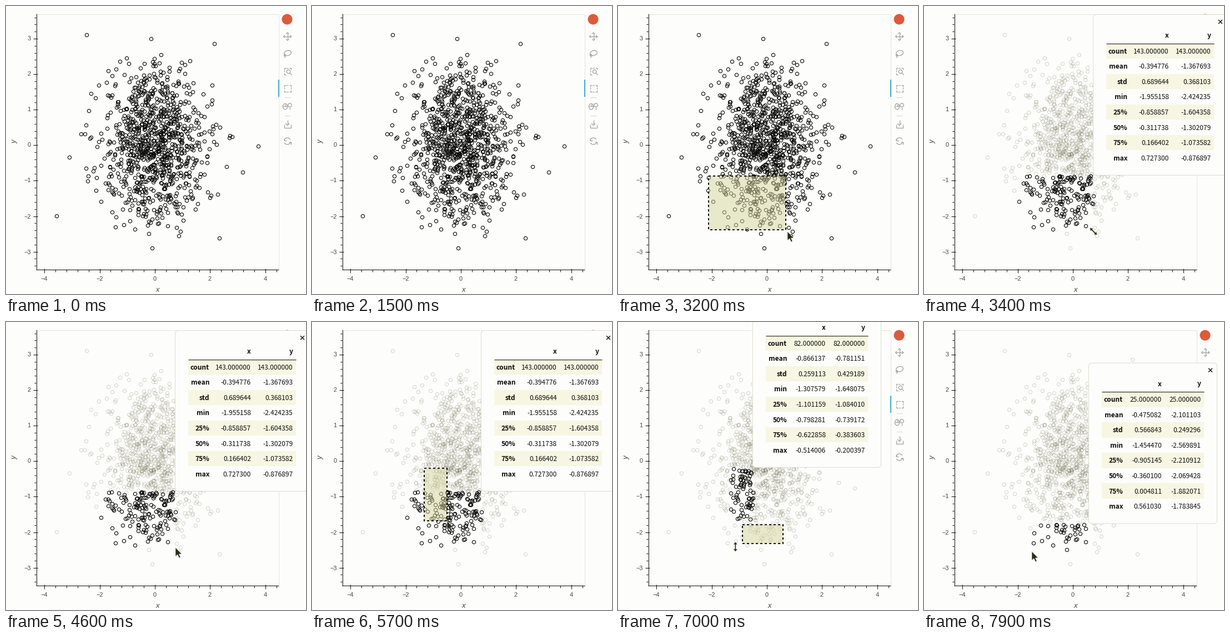
These frames come from a looping animation (540 px wide and 520 px high, 8000 ms). A matplotlib script:

```python
import numpy as np
import matplotlib.pyplot as plt
from matplotlib.animation import FuncAnimation
from matplotlib.patches import Arc, Circle, Ellipse, FancyBboxPatch, Polygon, Rectangle

W, H, PX = 540, 520, 0.72  # PX: points per pixel at 100 dpi
FRAMES, STEP = 80, 100
BG, INK, GREY, ICON = "#fdfdfb", "#0c0c0a", "#444442", "#a3a39e"
TABLE_FONT = "Noto Sans CJK JP"

fig = plt.figure(figsize=(W / 100, H / 100), dpi=100, facecolor=BG)
ax = fig.add_axes([0, 0, 1, 1])
ax.set_xlim(0, W)
ax.set_ylim(H, 0)
ax.axis("off")


def sx(x):
    return 267.5 + 49.7 * np.asarray(x)


def sy(y):
    return 250.8 - 64.1 * np.asarray(y)


def line(xs, ys, color=INK, lw=1.0, z=2, **kw):
    return ax.plot(xs, ys, color=color, lw=lw * PX, zorder=z,
                   solid_capstyle="butt", **kw)[0]


def text(x, y, s, size, z=2, **kw):
    kw.setdefault("va", "baseline")
    return ax.text(x, y, s, fontsize=size * PX, zorder=z, **kw)


def shape(patch, z=2):
    patch.set_zorder(z)
    return ax.add_patch(patch)


# --- axes -------------------------------------------------------------
def draw_axes():
    line([54, 490.5, 490.5], [14.5, 14.5, 475], "#e6e6dc")
    line([54.5, 54.5], [14, 476])
    line([54, 491], [475.5, 475.5])
    font = dict(color=GREY, family="Liberation Sans")
    for k in range(-10, 12):
        x = np.floor(sx(0.4 * k)) + 0.5
        major = k % 5 == 0
        line([x, x], [473.5 if major else 476, 481.5 if major else 479.5])
        if major:
            text(x, 495.5, f"{2 * k // 5}".replace("-", "\u2212"), 11, ha="center", **font)
    for k in range(-17, 19):
        y = np.floor(sy(0.2 * k)) + 0.5
        major = k % 5 == 0
        line([48.5 if major else 50.5, 56.5 if major else 54], [y, y])
        if major:
            text(44.5, y + 4, f"{k // 5}".replace("-", "\u2212"), 11, ha="right", **font)
    text(273, 516, "x", 13, ha="center", style="italic", **font)
    text(15.5, 244.5, "y", 13, ha="center", va="center", rotation=90, style="italic", **font)


# --- toolbar ----------------------------------------------------------
def ring(x, y, w, h, angle=0):
    shape(Ellipse((x, y), w, h, angle=angle, fill=False, ec=ICON, lw=1.3 * PX))


def stroke(*pts):
    line(*zip(*pts), color=ICON, lw=1.3)


def dashed_box(x, y, r):
    for s in (-1, 1):
        for v in (-1, 1):
            cx, cy = x + s * r, y + v * r
            stroke((cx - s * 3, cy), (cx, cy), (cx, cy - v * 3))
        stroke((x + s * r, y - 1.5), (x + s * r, y + 1.5))
        stroke((x - 1.5, y + s * r), (x + 1.5, y + s * r))


def draw_toolbar():
    shape(Circle((506, 24), 9.5, fc="#dd5a3c", ec="none"))
    x = 506.5

    # pan
    stroke((x - 7, 55), (x + 7, 55))
    stroke((x, 48), (x, 62))
    for s in (-1, 1):
        stroke((x + s * 4.5, 52.5), (x + s * 7, 55), (x + s * 4.5, 57.5))
        stroke((x - 2.5, 55 + s * 4.5), (x, 55 + s * 7), (x + 2.5, 55 + s * 4.5))

    # lasso
    ring(507, 85, 13, 9, -15)
    ring(502, 89, 3, 3)
    stroke((502, 90.5), (502.5, 92), (501.5, 93.5))

    # box zoom
    dashed_box(x, 117.5, 6)
    shape(Rectangle((505, 115), 10, 10, fc=BG, ec="none"))
    ring(508.5, 118.5, 6.5, 6.5)
    stroke((511, 121), (514.5, 124.5))

    # box select, active
    dashed_box(x, 148.5, 6)
    shape(Rectangle((490, 133), 2, 31, fc="#3fa9c4", ec="none"), 3)

    # wheel zoom
    ring(502.5, 181.5, 8, 10.5)
    stroke((498.5, 181), (506.5, 181))
    stroke((502.5, 176.5), (502.5, 181))
    ring(511, 179, 6.5, 6.5)
    stroke((511, 182.5), (511, 187))

    for y in (164.5, 197.5):
        line([501, 512], [y, y], "#d4d4cc")

    # save
    stroke((x, 206), (x, 215))
    stroke((x - 3.5, 212), (x, 215.5), (x + 3.5, 212))
    stroke((x - 6, 214), (x - 6, 219.5), (x + 6, 219.5), (x + 6, 214))

    # reset
    for s, a in ((-1, 190), (1, 10)):
        shape(Arc((x, 244), 12, 12, theta1=a, theta2=a + 140, ec=ICON, lw=1.3 * PX))
        stroke((x + s * 6, 244 + s * 5.5), (x + s * 6, 244 + s * 1.5), (x + s * 2, 244 + s * 1.5))


# --- points -----------------------------------------------------------
def make_points(n=1000):
    far = [(-2.46, 3.1), (-0.13, 3.0), (2.17, 2.85), (-3.55, -2.0), (3.75, -0.03),
           (2.34, -2.63), (-3.08, -0.35), (2.8, 0.23), (3.19, -0.76), (-0.1, -2.9)]
    cloud = np.random.default_rng(12).standard_normal((2 * n, 2))
    cloud = cloud[np.hypot(*cloud.T) < 2.8]
    pts = np.vstack([far, cloud[:n - len(far)]])
    return np.column_stack([sx(pts[:, 0]), sy(pts[:, 1])])


points = make_points()


def markers(color, alpha, z):
    return ax.plot([], [], "o", mfc="none", mec=color, alpha=alpha,
                   ms=6.2 * PX, mew=1.15 * PX, zorder=z)[0]


muted = markers("#5c5c3c", 0.22, 3)
bright = markers(INK, 1, 4)


# --- selections ---------------------------------------------------------
class Selection:
    """One box drag and the statistics popup that follows it."""

    def __init__(self, begin, end, shown, start, stop, bend, xs, ys):
        self.begin, self.end, self.shown, self.bend = begin, end, shown, bend
        self.start, self.stop = np.array(start), np.array(stop)
        self.popup = make_popup(max(start[0], stop[0]) - 1, start[1] - 1,
                                xs.split(), ys.split())

    def pointer(self, t):
        u = np.clip((t - self.begin) / (self.end - self.begin), 0, 1)
        ease = np.sin(u * np.pi / 2)
        return self.start + (self.stop - self.start) * (ease, ease ** self.bend)

    def chosen(self):
        lo, hi = np.minimum(self.start, self.stop), np.maximum(self.start, self.stop)
        return ((points > lo) & (points < hi)).all(axis=1)


ROWS = ["count", "mean", "std", "min", "25%", "50%", "75%", "max"]


def make_popup(left, bottom, xs, ys):
    width = 172 + 6 * len(xs[0]) + 4 * (len(xs[0]) > 9)
    width = width + 6
    top, right, z = bottom - 291, left + width, 10
    cols = (left + 62, left + (width + 32) / 2, right - 29.5)
    parts = [shape(FancyBboxPatch(
        (left + 0.5, top + 0.5), width - 1, 290, fc=BG, ec="#deded0", lw=PX,
        boxstyle="round,pad=0,rounding_size=6"), z)]

    def cell(x, y, s, weight="normal"):
        parts.append(text(x, y, s, 12, z + 2, ha="right", weight=weight,
                          color=INK, family=TABLE_FONT))

    for x, name in zip(cols[1:], "xy"):
        cell(x, top + 42, name, "bold")
    for i, (name, vx, vy) in enumerate(zip(ROWS, xs, ys)):
        mid = top + 66.3 + 27.55 * i
        if i % 2 == 0:
            parts.append(shape(Rectangle((left + 24, mid - 13.8), width - 48, 27.6,
                                         fc="#f6f6e2", ec="none"), z + 1))
        cell(cols[0], mid + 4.5, name, "bold")
        cell(cols[1], mid + 4.5, vx)
        cell(cols[2], mid + 4.5, vy)
    parts.append(line([left + 24, right - 24], [top + 52.5] * 2, z=z + 2))
    for s in (-3.5, 3.5):
        parts.append(line([right - 16, right - 9], [top + 13.5 - s, top + 13.5 + s],
                          lw=1.4, z=z + 2))
    return parts


SELECTIONS = [
    Selection(
        2450, 3200, 3300, (163, 307), (305, 407), 1.5,
        "143.000000 -0.394776 0.689644 -1.955158 -0.858857 -0.311738 0.166402 0.727300",
        "143.000000 -1.367693 0.368103 -2.424235 -1.604358 -1.302079 -1.073582 -0.876897"),
    Selection(
        5000, 5600, 6000, (202, 264), (243, 359), 1,
        "82.000000 -0.866137 0.259113 -1.307579 -1.101159 -0.798281 -0.622858 -0.514006",
        "82.000000 -0.781151 0.429189 -1.648075 -1.084010 -0.739172 -0.383603 -0.200397"),
    Selection(
        6500, 7300, 7500, (297, 365.5), (194, 414), 1,
        "25.000000 -0.475082 0.566843 -1.454470 -0.905145 -0.360100 0.004811 0.561030",
        "25.000000 -2.101103 0.249296 -2.569891 -2.210912 -2.069428 -1.882071 -1.783845"),
]

# --- pointer and drag box -----------------------------------------------
ENTRY, LAG, TRAVEL = np.array([238, 256]), 100, 400

ARROW = np.array([(0, 0), (0, 16.5), (3.8, 13), (6.6, 19), (9.2, 17.8), (6.5, 12), (11.5, 12)])
HALF = np.array([(0, -9), (4, -4), (1.2, -4), (1.2, 4), (4, 4)])
RESIZE = np.vstack([HALF, -HALF])
DIAGONAL = RESIZE @ np.array([(1, -1), (1, 1)]) / np.sqrt(2)

pointer = shape(Polygon(ARROW, closed=True, fc="#2a2a1c", ec="#f6f6ea", lw=0.5), 20)
box_fill = shape(Rectangle((0, 0), 1, 1, fc="#d6d5a0", ec="none", alpha=0.52), 5)
box_edge = shape(Rectangle((0, 0), 1, 1, fill=False, ec=INK, lw=2 * PX,
                           ls=(0, (2, 2)), capstyle="butt"), 6)


def pointer_at(t):
    """Rest, glide to the next corner, then follow the drag."""
    pos = ENTRY
    for s in SELECTIONS:
        if t >= s.begin:
            pos = s.pointer(t)
        else:
            u = np.clip((t - s.begin + TRAVEL) / TRAVEL, 0, 1)
            return pos + (s.start - pos) * u * u * (3 - 2 * u)
    return pos


def pointer_shape(t):
    if 3300 <= t < 4600:
        return DIAGONAL
    if 6950 <= t < 7100:
        return RESIZE
    return ARROW


def update(i):
    t = i * STEP

    pointer.set_xy(pointer_shape(t) + pointer_at(t))
    pointer.set_alpha(np.clip((t - 1000) / 2200, 0, 1))

    drag = next((s for s in SELECTIONS if s.begin + LAG < t < s.shown), None)
    for box in (box_fill, box_edge):
        box.set_visible(drag is not None)
        if drag:
            corner = drag.pointer(t - LAG)
            box.set_xy(np.minimum(drag.start, corner))
            box.set_width(abs(corner[0] - drag.start[0]))
            box.set_height(abs(corner[1] - drag.start[1]))

    done = [s for s in SELECTIONS if s.shown <= t]
    chosen = done[-1].chosen() if done else np.ones(len(points), bool)
    bright.set_data(*points[chosen].T)
    muted.set_data(*points[~chosen].T)
    for s in SELECTIONS:
        for part in s.popup:
            part.set_visible(bool(done) and s is done[-1])
    return []


draw_axes()
draw_toolbar()
anim = FuncAnimation(fig, update, frames=FRAMES, interval=STEP, repeat=True,
                     repeat_delay=0, blit=False)
plt.show()
```
